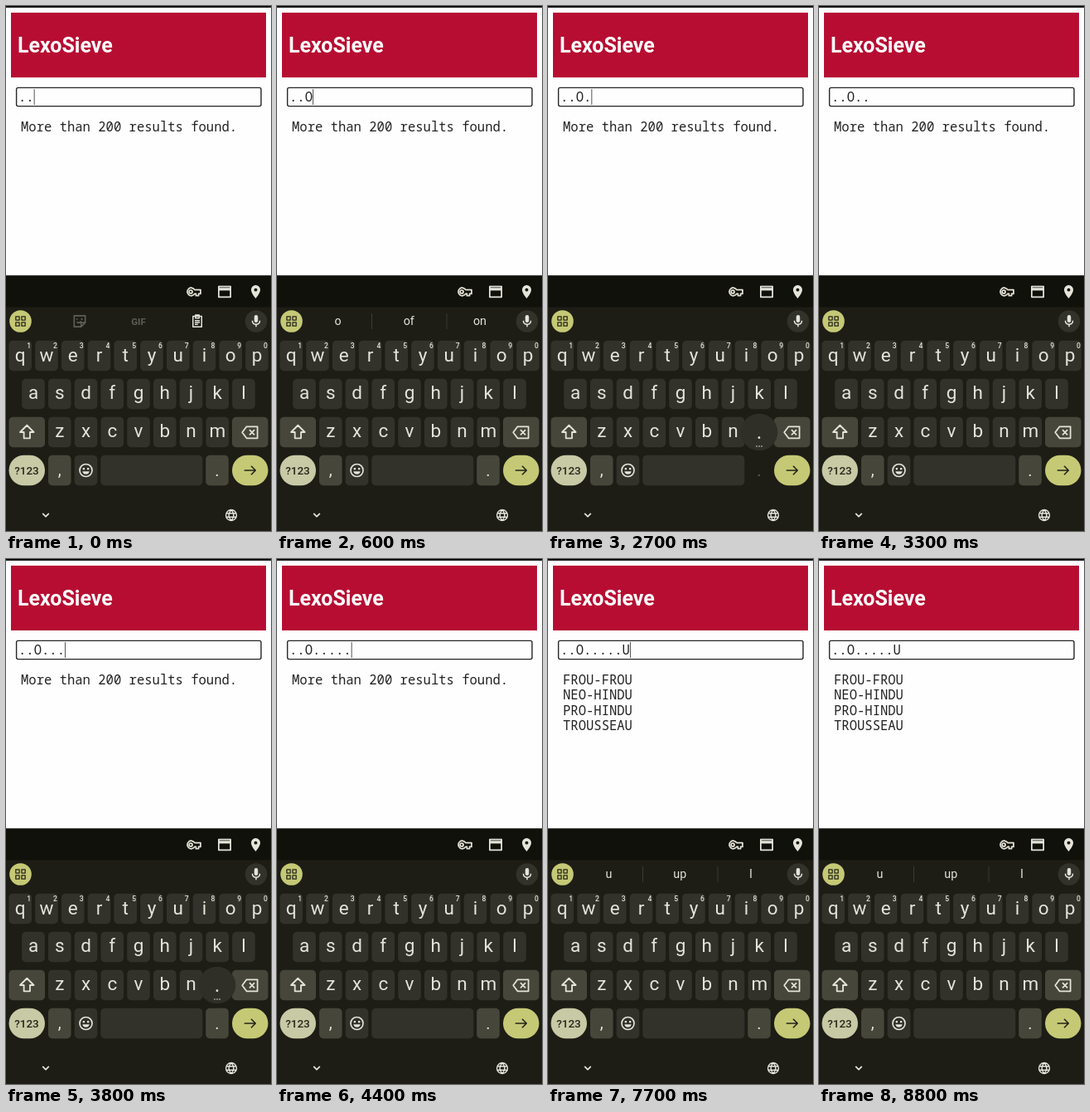
An HTML page with a canvas for the animation above (9300 ms loop, 320 by 632 pixels).

```html
<!DOCTYPE html>
<html lang="en">
<head>
<meta charset="utf-8">
<title>LexoSieve</title>
<style>
html, body { margin: 0; width: 100%; height: 100%; overflow: hidden; background: #fffeff; }
canvas { display: block; width: 320px; height: 632px; }
</style>
</head>
<body>
<canvas id="stage"></canvas>
<script>
const W = 320, H = 632, LOOP = 9300, BLINK = 500;
const MONO = '15.55px "Noto Sans Mono", monospace';
const SANS = 'Roboto, sans-serif';
const C = {
  board: '#1d1d16', bar: '#11110b', key: '#32322b', special: '#46473a',
  accent: '#c5c975', pale: '#c8c9a5', ink: '#e5e4da', dim: '#5e5e54', dark: '#25261a'
};

// Each press: key down, commit on release, key preview hidden.
const presses = [
  { key: 'o', down: 400, up: 500, hide: 600 },
  { key: '.', down: 2100, up: 2300, hide: 2400 },
  { key: '.', down: 2700, up: 2800, hide: 2900 },
  { key: '.', down: 3700, up: 3800, hide: 3900 },
  { key: '.', down: 3900, up: 4000, hide: 4200 },
  { key: '.', down: 4200, up: 4300, hide: 4400 },
  { key: 'u', down: 5100, up: 5300, hide: 5400 }
];
const suggestions = { o: ['o', 'of', 'on'], u: ['u', 'up', 'I'] };
const matches = ['FROU-FROU', 'NEO-HINDU', 'PRO-HINDU', 'TROUSSEAU'];

const canvas = document.getElementById('stage');
const g = canvas.getContext('2d');
const ratio = window.devicePixelRatio || 1;
canvas.width = W * ratio;
canvas.height = H * ratio;

function rect(x, y, w, h, color) {
  g.fillStyle = color;
  g.fillRect(x, y, w, h);
}

function round(x, y, w, h, r, color) {
  g.beginPath();
  g.roundRect(x, y, w, h, r);
  g.fillStyle = color;
  g.fill();
}

function disc(x, y, r, color) {
  g.beginPath();
  g.arc(x, y, r, 0, Math.PI * 2);
  g.fillStyle = color;
  g.fill();
}

function text(str, x, y, font, color, align = 'center') {
  g.font = font;
  g.fillStyle = color;
  g.textAlign = align;
  g.fillText(str, x, y);
}

// Icons use a 24-unit box centred on (x, y).
function icon(d, x, y, size, color, width = 0) {
  const path = new Path2D(d);
  g.save();
  g.translate(x - size / 2, y - size / 2);
  g.scale(size / 24, size / 24);
  if (width) {
    g.strokeStyle = color;
    g.lineWidth = width;
    g.lineJoin = 'round';
    g.stroke(path);
  } else {
    g.fillStyle = color;
    g.fill(path, 'evenodd');
  }
  g.restore();
}

const ICONS = {
  key: 'M13 9H22V15H19V18H15V15H13A6 6 0 1 1 13 9ZM7 9.5A2.5 2.5 0 1 0 7 14.5A2.5 2.5 0 1 0 7 9.5Z',
  card: 'M3 4H21V20H3ZM3 9H21M3 7H21',
  pin: 'M12 2A7 7 0 0 0 5 9C5 14 12 22 12 22S19 14 19 9A7 7 0 0 0 12 2ZM12 6.5A2.5 2.5 0 1 0 12 11.5A2.5 2.5 0 1 0 12 6.5Z',
  grid: 'M4 4H10V10H4ZM14 4H20V10H14ZM4 14H10V20H4ZM14 14H20V20H14Z',
  sticker: 'M4 4H20V14L14 20H4ZM14 20V14H20M8 8V10M14 8L16 10M8 13Q11 16 14 12',
  clip: 'M5 4H19V21H5ZM9 2H15V7H9ZM8 11H16M8 14H16M8 17H13',
  mic: 'M12 2A3 3 0 0 0 9 5V11A3 3 0 0 0 15 11V5A3 3 0 0 0 12 2ZM5 11H7A5 5 0 0 0 17 11H19A7 7 0 0 1 13 18V21H11V18A7 7 0 0 1 5 11Z',
  shift: 'M12 3L3 12H8V20H16V12H21Z',
  erase: 'M8 4H23V20H8L2 12ZM12 8.5L19 15.5M19 8.5L12 15.5',
  arrow: 'M3 12H21M14 5L21 12L14 19',
  chevron: 'M5 8L12 15L19 8',
  globe: 'M12 2A10 10 0 1 0 12 22A10 10 0 1 0 12 2ZM12 2Q3 12 12 22Q21 12 12 2M3 8.5H21M3 15.5H21',
  face: 'M12 2A10 10 0 1 0 12 22A10 10 0 1 0 12 2Z',
  smile: 'M6.5 13.5H17.5A5.6 5.6 0 0 1 6.5 13.5ZM7 8H10V11H7ZM14 8H17V11H14Z'
};

const rows = [
  { keys: 'qwertyuiop', x: 17.2, y: 421, base: 427.5 },
  { keys: 'asdfghjkl', x: 33, y: 467, base: 473 },
  { keys: 'zxcvbnm', x: 64.8, y: 513, base: 519 }
];
const PITCH = 31.75;
const keyPos = { '.': { x: 255, y: 559 } };
for (const row of rows) {
  [...row.keys].forEach((k, i) => keyPos[k] = { x: row.x + i * PITCH, y: row.y });
}

function drawPage(entry, caretOn, solved) {
  rect(0, 0, W, 325, '#fffeff');
  rect(0, 0, W, 2, '#111');
  rect(6, 8, 308, 78, '#b70d32');
  text('LexoSieve', 14, 56, 'bold 25px ' + SANS, '#fff', 'left');

  g.beginPath();
  g.roundRect(12.6, 98.4, 295.4, 22.2, 2);
  g.strokeStyle = '#262626';
  g.lineWidth = 1.4;
  g.stroke();
  text(entry, 15, 115, MONO, '#222', 'left');
  if (caretOn) rect(15 + entry.length * 9.33, 100, 1, 19, '#555');

  const lines = solved ? matches : ['More than 200 results found.'];
  lines.forEach((line, i) => text(line, 18, 151 + i * 18.4, MONO, '#222', 'left'));
}

function drawToolbar(words, showTools) {
  rect(0, 324.5, W, 38, C.bar);
  icon(ICONS.key, 227, 344, 19, C.ink, 2.2);
  icon(ICONS.card, 264, 344, 19, C.ink, 2.2);
  icon(ICONS.pin, 301.5, 344, 19, C.ink);

  disc(17.5, 379.5, 13.3, C.accent);
  icon(ICONS.grid, 17.5, 379.5, 17, C.dark, 1.8);
  disc(302, 379.5, 13.3, C.key);
  icon(ICONS.mic, 302, 379.5, 18, C.ink);

  if (showTools) {
    icon(ICONS.sticker, 89, 379.5, 20, C.dim, 2);
    text('GIF', 160, 384, 'bold 11.5px ' + SANS, C.dim);
    icon(ICONS.clip, 231, 379.5, 18, C.ink, 2);
  }
  if (words) {
    words.forEach((word, i) => text(word, 73.5 + i * 85.7, 384.3, '14.3px ' + SANS, C.ink));
    rect(114, 370, 1, 19, '#3b3b33');
    rect(204.5, 370, 1, 19, '#3b3b33');
  }
}

function drawKeys(held) {
  rows.forEach((row, r) => [...row.keys].forEach((k, i) => {
    const x = row.x + i * PITCH, down = k === held;
    if (!down) round(x - 13.8, row.y - 18.3, 27.6, 36.6, 5, C.key);
    text(k, x, row.base, '22.5px ' + SANS, down ? C.dim : C.ink);
    if (r === 0) text((i + 1) % 10, x + 10.5, 412, '500 8.5px ' + SANS, C.ink);
  }));

  round(3.5, 494.7, 43.5, 36.6, 5, C.special);
  icon(ICONS.shift, 25.3, 513, 22, C.ink, 2);
  round(273, 494.7, 43.5, 36.6, 5, C.special);
  icon(ICONS.erase, 294, 513.3, 21, C.ink, 2);

  round(3.5, 540.7, 43.5, 36.6, 18.3, C.pale);
  text('?123', 25, 563.5, '500 13.5px ' + SANS, C.dark);
  round(51, 540.7, 27.6, 36.6, 5, C.special);
  text(',', 64.8, 565, '20px ' + SANS, C.ink);
  round(82.7, 540.7, 27.6, 36.6, 5, C.key);
  icon(ICONS.face, 96.5, 559, 18, C.ink, 2.2);
  icon(ICONS.smile, 96.5, 559, 18, C.ink);
  round(114.3, 540.7, 123, 36.6, 5, C.key);
  const dotHeld = held === '.';
  if (!dotHeld) round(241.2, 540.7, 27.6, 36.6, 5, C.special);
  text('.', 255, 566, '20px ' + SANS, dotHeld ? C.dim : C.ink);
  round(273, 540.7, 43.5, 36.6, 18.3, C.accent);
  icon(ICONS.arrow, 294.5, 559, 18, C.dark, 2.2);

  icon(ICONS.chevron, 48, 613, 13, C.ink, 3.2);
  icon(ICONS.globe, 272, 613, 15.5, C.ink, 2.2);
}

function drawPreview(key) {
  const { x, y } = keyPos[key];
  disc(x, y - 46, 22.3, '#2f2f28');
  text(key, x, y - 38, '25px ' + SANS, C.ink);
  if (key === '.') for (const dx of [-3, 0, 3]) disc(x + dx, y - 29, 0.8, C.ink);
}

function render(t) {
  const done = presses.filter(p => t >= p.up);
  const last = done[done.length - 1];
  const active = presses.find(p => t >= p.down && t < p.hide);
  const entry = '..' + done.map(p => p.key.toUpperCase()).join('');
  const caretOn = Math.floor((t - (last ? last.up : -300)) / BLINK) % 2 === 0;
  const words = last && t >= last.hide ? suggestions[last.key] : null;

  g.setTransform(ratio, 0, 0, ratio, 0, 0);
  drawPage(entry, caretOn, last && last.key === 'u');
  rect(0, 324.5, W, H - 324.5, C.board);
  drawToolbar(words, t < presses[0].up);
  drawKeys(active && t < active.up ? active.key : null);
  if (active) drawPreview(active.key);
}

const start = performance.now();
function tick() {
  render((performance.now() - start) % LOOP);
  requestAnimationFrame(tick);
}
tick();
</script>
</body>
</html>
```
